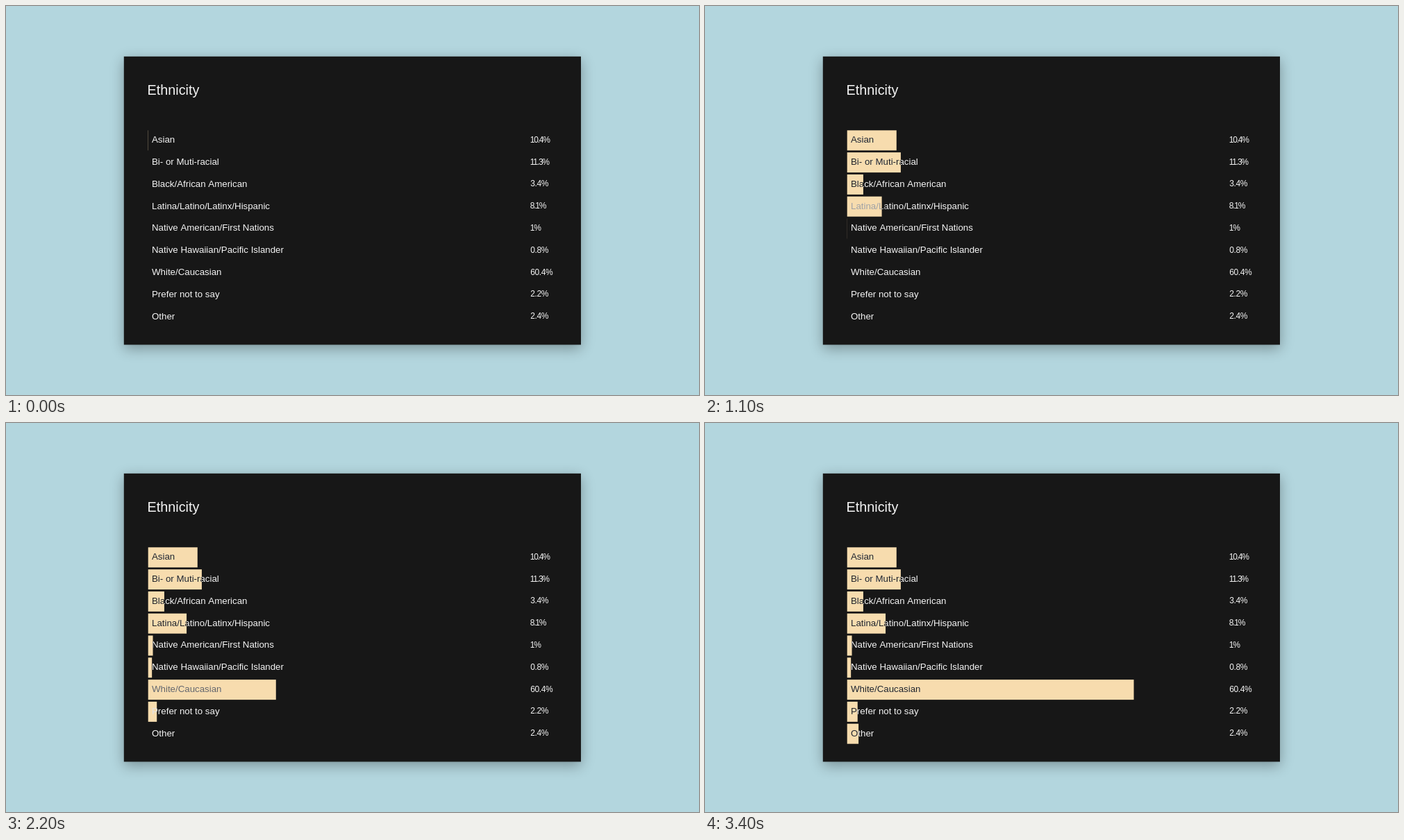
Animation, 998 px wide and 561 px high, one loop 3900 ms. Source, as an HTML page with a canvas:

```html
<!DOCTYPE html>
<html lang="en">
<head>
<meta charset="utf-8">
<title>Ethnicity chart</title>
<style>
  html, body { margin: 0; width: 100%; height: 100%; overflow: hidden; background: #b3d6de; }
  canvas { display: block; }
</style>
</head>
<body>
<canvas id="stage" width="998" height="561"></canvas>
<script>
const ctx = document.getElementById('stage').getContext('2d');
const LOOP = 3900, STEP = 100;
const LEFT = 204.7, TOP = 179.3, PITCH = 31.8, BAR_HEIGHT = 29, PX_PER_PERCENT = 6.835;
const CARD = '#171717', BAR = '#f7dcae', LIGHT = '#f4f4f4', DARK = '#212020';
const FAMILY = '"Liberation Sans", Arial, sans-serif';

// label, percent, bar start, bar duration, label fade start (ms)
const rows = [
  ['Asian', 10.4, -20, 240, 60],
  ['Bi- or Muti-racial', 11.3, 398, 225, 440],
  ['Black/African American', 3.4, 650, 230, 690],
  ['Latina/Latino/Latinx/Hispanic', 8.1, 917, 230, 950],
  ['Native American/First Nations', 1, 1060, 230, 1110],
  ['Native Hawaiian/Pacific Islander', 0.8, 1350, 230, 1400],
  ['White/Caucasian', 60.4, 1691, 832, 1940],
  ['Prefer not to say', 2.2, 2027, 230, 2170],
  ['Other', 2.4, 2330, 230, 2560]
];

const clamp = v => Math.max(0, Math.min(1, v));
const bezier = (a, b, u) => 3 * (1 - u) ** 2 * u * a + 3 * (1 - u) * u * u * b + u ** 3;

// Cubic ease with control points (.83, 0) and (.52, 1)
function ease(p) {
  if (p <= 0 || p >= 1) return clamp(p);
  let lo = 0, hi = 1;
  for (let i = 0; i < 24; i++) {
    const mid = (lo + hi) / 2;
    if (bezier(.83, .52, mid) < p) lo = mid; else hi = mid;
  }
  return bezier(0, 1, lo);
}

function text(str, x, y, size, color = LIGHT, spacing = 0) {
  ctx.font = `${size}px ${FAMILY}`;
  ctx.letterSpacing = spacing + 'px';
  ctx.fillStyle = color;
  ctx.fillText(str, x, y);
}

function drawCard() {
  ctx.fillStyle = '#b3d6de';
  ctx.fillRect(0, 0, 998, 561);
  ctx.save();
  ctx.shadowColor = 'rgba(0, 0, 0, .32)';
  ctx.shadowBlur = 18;
  ctx.shadowOffsetY = 5;
  ctx.fillStyle = CARD;
  ctx.fillRect(169.8, 72.8, 658.2, 415.7);
  ctx.restore();
  text('Ethnicity', 203.6, 128, 19.8);
}

function drawRow([label, percent, start, duration, fadeStart], i, t) {
  const y = TOP + i * PITCH, base = y + 17.8, width = percent * PX_PER_PERCENT;
  const value = percent + '%', narrow = value.includes('1');

  ctx.fillStyle = BAR;
  ctx.fillRect(LEFT, y, width * ease((t - start) / duration), BAR_HEIGHT);
  text(label, 210, base, 13.3);
  text(value, narrow ? 754.7 : 755.2, base - .4, 12, LIGHT, narrow ? -1.2 : -.4);

  // Dark copy of the label, limited to the finished bar
  ctx.save();
  ctx.beginPath();
  ctx.rect(LEFT, y, width, BAR_HEIGHT);
  ctx.clip();
  ctx.globalAlpha = clamp((t - fadeStart) / 380);
  text(label, 210, base, 13.3, DARK);
  ctx.restore();
}

const origin = performance.now();
function frame() {
  const elapsed = (performance.now() - origin) % LOOP;
  const t = Math.floor(elapsed / STEP) * STEP;
  drawCard();
  rows.forEach((row, i) => drawRow(row, i, t));
  requestAnimationFrame(frame);
}
frame();
</script>
</body>
</html>
```
